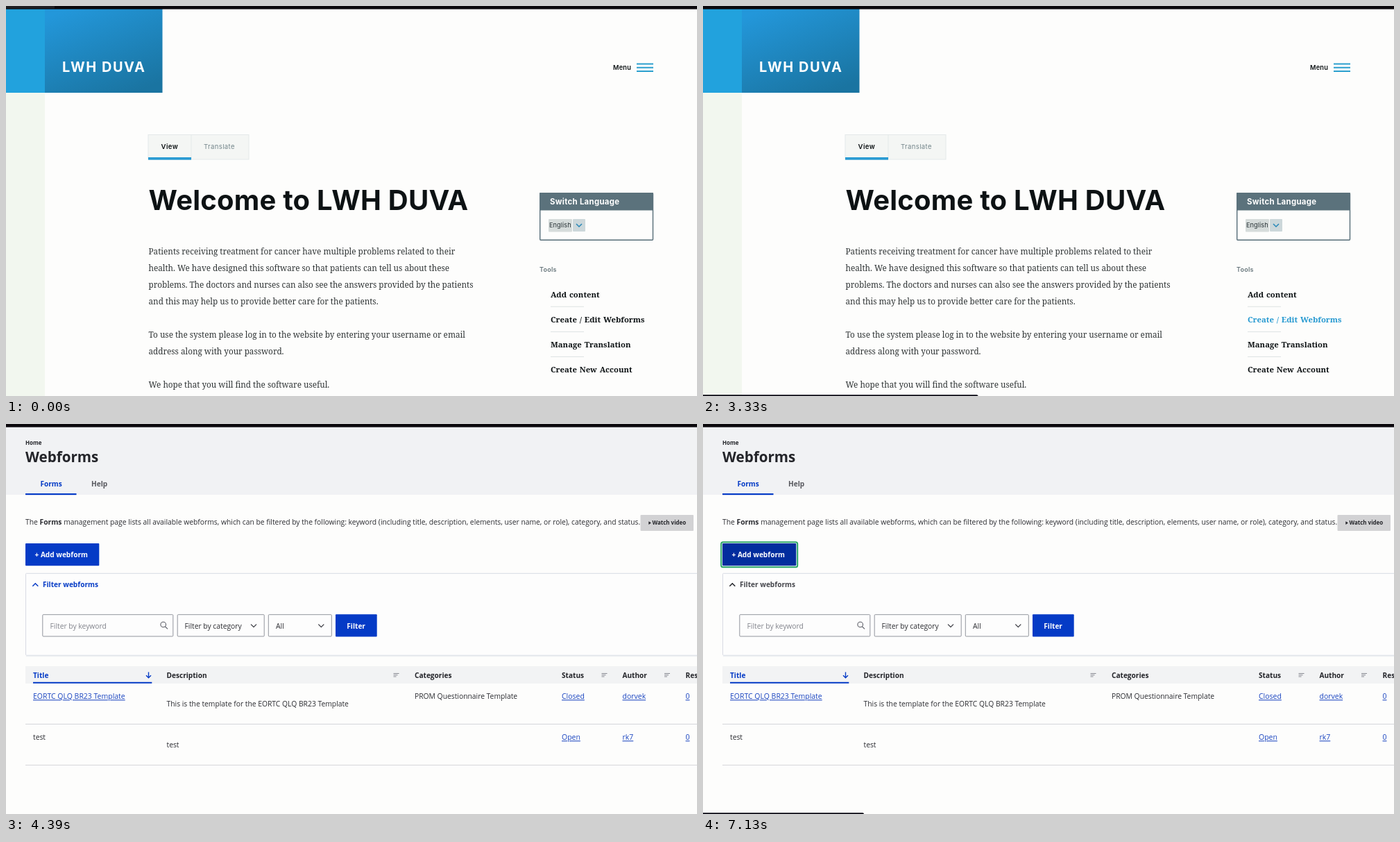
These frames come from a looping animation (996 by 562 pixels, 8 s). An HTML page:

```html
<!DOCTYPE html>
<html lang="en">
<head>
<meta charset="utf-8">
<title>Webform walkthrough</title>
<style>
  html, body { margin: 0; width: 100%; height: 100%; overflow: hidden; background: #fdfdfc; }
  svg { display: block; width: 100vw; height: 100vh; }
  text { white-space: pre; }
  .geo { font-family: Inter, sans-serif; fill: #0d1214; }
  .serif { font: 11.72px "Noto Serif", serif; fill: #313637; }
  .link { font: 700 11.35px "Noto Serif", serif; word-spacing: 0.9px; fill: #0d1214; }
  .ui { font: 10.32px "Open Sans", sans-serif; fill: #2b2c31; }
  .b { font: 700 10.1px "Open Sans", sans-serif; fill: #232429; }
  .a { font: 10.48px "Open Sans", sans-serif; fill: #1a45c0; text-decoration: underline; }
  .tiny { font: 700 7.95px "Open Sans", sans-serif; fill: #232429; }
</style>
</head>
<body>
<svg id="stage" viewBox="0 0 996 562" preserveAspectRatio="none">
  <defs>
    <linearGradient id="brand" x1="0.2" y1="0" x2="0.75" y2="1">
      <stop offset="0" stop-color="#2397da"/>
      <stop offset="1" stop-color="#1a74a1"/>
    </linearGradient>
    <filter id="soft" x="-50%" y="-50%" width="200%" height="200%">
      <feDropShadow dx="0" dy="1.5" stdDeviation="2" flood-color="#222330" flood-opacity="0.2"/>
    </filter>
  </defs>
  <rect width="996" height="562" fill="#fdfdfc"/>
  <g id="welcome"></g>
  <g id="forms"></g>
  <rect width="996" height="4.6" fill="#0b080c"/>
  <rect id="tab" width="70" height="3.5" fill="#1f1d22"/>
  <path id="status" fill="#0b0a14"/>
</svg>
<script>
const LOOP = 8000;
const BLUE = "#053bc6";
const INK = "#232429";
const SITE = "LWH DUVA";
const $ = id => document.getElementById(id);
const clamp = v => Math.max(0, Math.min(1, v));
const ramp = (t, from, to) => clamp((t - from) / (to - from));
const during = (t, from, to) => t >= from && t < to;
const mix = (a, b, k) => `rgb(${a.map((v, i) => Math.round(v + (b[i] - v) * k))})`;

const attrs = o => Object.entries(o).map(([k, v]) => ` ${k}="${v}"`).join("");
const rect = (x, y, w, h, fill, more = {}) =>
  `<rect${attrs({ x, y, width: w, height: h, fill, ...more })}/>`;
const path = (d, stroke, width = 1, more = {}) =>
  `<path${attrs({ d, stroke, "stroke-width": width, fill: "none", ...more })}/>`;
const text = (x, y, cls, s, style = "", id = "") =>
  `<text${attrs({ x, y, class: cls, style })}${id && ` id="${id}"`}>${s}</text>`;
const geo = (x, y, s, size, weight, spacing, fill = "#0d1214") =>
  text(x, y, "geo", s, `font-size:${size}px;font-weight:${weight};letter-spacing:${spacing}px;fill:${fill}`);
const chevron = (x, y, dir, w, stroke, width, more) =>
  path(`M${x - w} ${y - dir * w / 2}l${w} ${dir * w}l${w} ${-dir * w}`, stroke, width, more);

function welcomePage() {
  const copy = [
    [358, "Patients receiving treatment for cancer have multiple problems related to their"],
    [382, "health. We have designed this software so that patients can tell us about these"],
    [406, "problems. The doctors and nurses can also see the answers provided by the patients"],
    [430, "and this may help us to provide better care for the patients."],
    [478, "To use the system please log in to the website by entering your username or email"],
    [501.5, "address along with your password."],
    [550, "We hope that you will find the software useful."]
  ];
  const tools = ["Add content", "Create / Edit Webforms", "Manage Translation", "Create New Account"];
  return [
    rect(0, 125, 56, 437, "#f2f7ef"),
    rect(0, 4, 57, 121, "#22a2dd"),
    rect(56, 4, 169.5, 121, "url(#brand)"),
    geo(81, 95, SITE, 20, 700, 1.5, "#fff"),
    geo(875, 91.8, "Menu", 9.2, 600, 0.2),
    path("M909 83.5h24M909 88.8h24M909 94h24", "#2b9fce", 2),
    rect(205, 185.5, 145, 35.5, "#f4f6f4", { stroke: "#e4e9e9" }),
    path("M267 186v35", "#e4e9e9"),
    rect(205, 218, 62, 3.7, "#2a9bd3"),
    geo(223.5, 206, "View", 9.6, 600, 0.4),
    geo(285, 206, "Translate", 9.5, 400, 0.4, "#73858a"),
    geo(205.5, 294, `Welcome to ${SITE}`, 40, 700, 0.2),
    ...copy.map(([y, s]) => text(205.5, y, "serif", s)),
    rect(769.7, 269.7, 162.8, 67.5, "#fdfdfc", { stroke: "#566d78", "stroke-width": 1.4, rx: 1 }),
    rect(769, 269, 164, 25.5, "#5b727c", { rx: 1 }),
    geo(784, 286.3, "Switch Language", 11.4, 700, 0.3, "#fff"),
    rect(782, 307, 34, 18.5, "#d6dcdb", { rx: 1 }),
    rect(817, 307, 18, 18, "#ccd7da", { rx: 1 }),
    geo(783, 319.2, "English", 9.2, 400, 0.05, "#2a3438"),
    chevron(826, 316, 1, 4, "#2788b8", 1.5),
    geo(769, 383, "Tools", 9, 600, 0.25, "#65747a"),
    ...tools.map((s, i) => text(785, 420 + 36.1 * i, "link", s, "", i === 1 ? "edit" : "")),
    path("M785 433.2h48M785 469.4h48M785 505.4h48", "#dde2e3"),
    `<g id="tip">`,
    rect(876, 465, 124, 16, "#252427", { filter: "url(#soft)" }),
    text(880.5, 476.3, "ui", "Click this link to setup up w", "font-size:9.2px;fill:#e9e9e9"),
    `</g>`
  ].join("");
}

function formsPage() {
  const sortIcon = x => path(`M${x - 4} 359.5h8M${x - 4} 361.8h6M${x - 4} 364h4`, "#85878f", 1.1);
  const field = (x, w) => rect(x, 274.7, w, 31.3, "#fdfdfd", { stroke: "#92959d", rx: 1 });
  const heads = [[231.5, "Description"], [589, "Categories"], [801, "Status"], [888.5, "Author"], [979.5, "Results"]];
  const links = [
    [39, 396.3, "EORTC QLQ BR23 Template"], [801, 396.3, "Closed"], [888.5, 396.3, "dorvek"], [979.5, 396.3, "0"],
    [801, 455.3, "Open"], [888.5, 455.3, "rk7"], [979.5, 455.3, "0"]
  ];
  return [
    rect(0, 4, 996, 98, "#f1f2f4"),
    text(28, 30, "tiny", "Home"),
    text(28, 54.8, "b", "Webforms", "font-size:20.6px"),
    text(49.5, 90, "b", "Forms", `fill:${BLUE}`),
    text(123, 90, "b", "Help", "fill:#55565c"),
    rect(28, 100, 73.5, 2.2, BLUE),
    text(28, 145.3, "ui", `The <tspan font-weight="700">Forms</tspan> management page lists all available webforms, ` +
      "which can be filtered by the following: keyword (including title, description, elements, " +
      "user name, or role), category, and status."),
    rect(914.5, 131, 76.5, 23, "#d2d2d4", { rx: 1 }),
    `<path d="M926.3 140.3l3.6 2.3l-3.6 2.3z" fill="${INK}"/>`,
    text(931.5, 145, "tiny", "Watch video"),
    rect(26.2, 170.2, 110, 36, "#fdfdfd", { id: "ring", stroke: "#27a567", "stroke-width": 2, rx: 2.5 }),
    rect(28, 172, 106.3, 32.3, BLUE, { id: "add", rx: 1 }),
    text(41.5, 192, "b", "+ Add webform", "fill:#fff"),
    rect(28.5, 215.3, 1000, 118, "#fdfdfd", { stroke: "#d8dbe4", rx: 1 }),
    path("M29 334.4h967", "#eceef1", 1.5),
    chevron(42.3, 231.7, -1, 4, INK, 1.5, { id: "fold" }),
    text(53, 235.4, "b", "Filter webforms", "", "summary"),
    field(52.8, 188), field(247.2, 125), field(378.3, 91),
    text(63.5, 294.5, "ui", "Filter by keyword", "fill:#82848c"),
    `<circle cx="226.7" cy="289" r="3.8" fill="none" stroke="#5b5d66" stroke-width="1.1"/>`,
    path("M229.4 291.8l3.6 3.6", "#5b5d66", 1.2),
    text(257.5, 294.5, "ui", "Filter by category"),
    text(389, 294.5, "ui", "All"),
    chevron(357, 290.6, 1, 4, "#3b3c43", 1.3),
    chevron(454.3, 290.6, 1, 4, "#3b3c43", 1.3),
    rect(475, 274.3, 59.7, 32.2, BLUE, { rx: 1 }),
    text(491.3, 294.5, "b", "Filter", "fill:#fff"),
    rect(28, 349, 968, 25, "#f2f3f4"),
    text(39, 365.5, "b", "Title", `fill:${BLUE}`),
    path("M205.5 357.5v8M202 362.3l3.5 3.5l3.5-3.5", BLUE, 1.4),
    rect(39, 371.8, 171.3, 2, BLUE),
    ...heads.map(([x, s]) => text(x, 365.5, "b", s)),
    ...[562.5, 862.5, 953].map(sortIcon),
    rect(28, 433, 968, 58.5, "#f0f6fa", { id: "hoverRow" }),
    path("M28 432.5h968M28 491.6h968", "#d5d6da"),
    ...links.map(([x, y, s]) => text(x, y, "a", s)),
    text(231.5, 407, "ui", "This is the template for the EORTC QLQ BR23 Template"),
    text(589, 396.3, "ui", "PROM Questionnaire Template"),
    text(39, 455.3, "ui", "test"),
    text(231.5, 466, "ui", "test"),
    `<g id="loader">`,
    `<circle cx="599" cy="275" r="18.4" fill="#fff" filter="url(#soft)"/>`,
    `<circle id="arc" cx="599" cy="275" r="8.7" fill="none" stroke="${BLUE}" stroke-width="2.1" pathLength="360" stroke-dasharray="255 105"/>`,
    `</g>`
  ].join("");
}

$("welcome").innerHTML = welcomePage();
$("forms").innerHTML = formsPage();

const set = (id, name, value) => $(id).setAttribute(name, value);
const show = (id, on) => set(id, "visibility", on ? "inherit" : "hidden");

function drawStatus(t) {
  const first = ramp(t, 880, 1000) * (1 - ramp(t, 3960, 4100));
  const second = ramp(t, 4790, 5010);
  const grow = ramp(t, 2520, 2680);
  const w = t < 4500 ? 212 + 184.5 * grow : 232;
  set("status", "d", `M0 560.2H${w - 2}q2 0 2 1.8H0z`);
  set("status", "opacity", t < 4500 ? first : second);
}

function draw(t) {
  const onForms = t >= 3500;
  set("welcome", "visibility", onForms ? "hidden" : "visible");
  set("forms", "visibility", onForms ? "visible" : "hidden");
  show("tab", t < 2520);

  $("edit").style.fill = mix([13, 18, 20], [36, 152, 208], ramp(t, 850, 1000));
  set("tip", "opacity", ramp(t, 1160, 1290) * (1 - ramp(t, 2520, 2640)));

  show("hoverRow", t < 4190);
  const folding = during(t, 4330, 4530);
  $("summary").style.fill = folding ? BLUE : "#45464c";
  set("fold", "stroke", folding ? BLUE : INK);
  set("add", "fill", mix([5, 59, 198], [2, 45, 158], ramp(t, 4530, 4600)));
  show("ring", t >= 5460);

  show("loader", during(t, 5500, 7130));
  set("arc", "transform", `rotate(${260 + (t - 6020) / 750 * 360} 599 275)`);
  drawStatus(t);
}

const start = performance.now();
function tick() {
  draw((performance.now() - start) % LOOP);
  requestAnimationFrame(tick);
}
tick();
</script>
</body>
</html>
```
